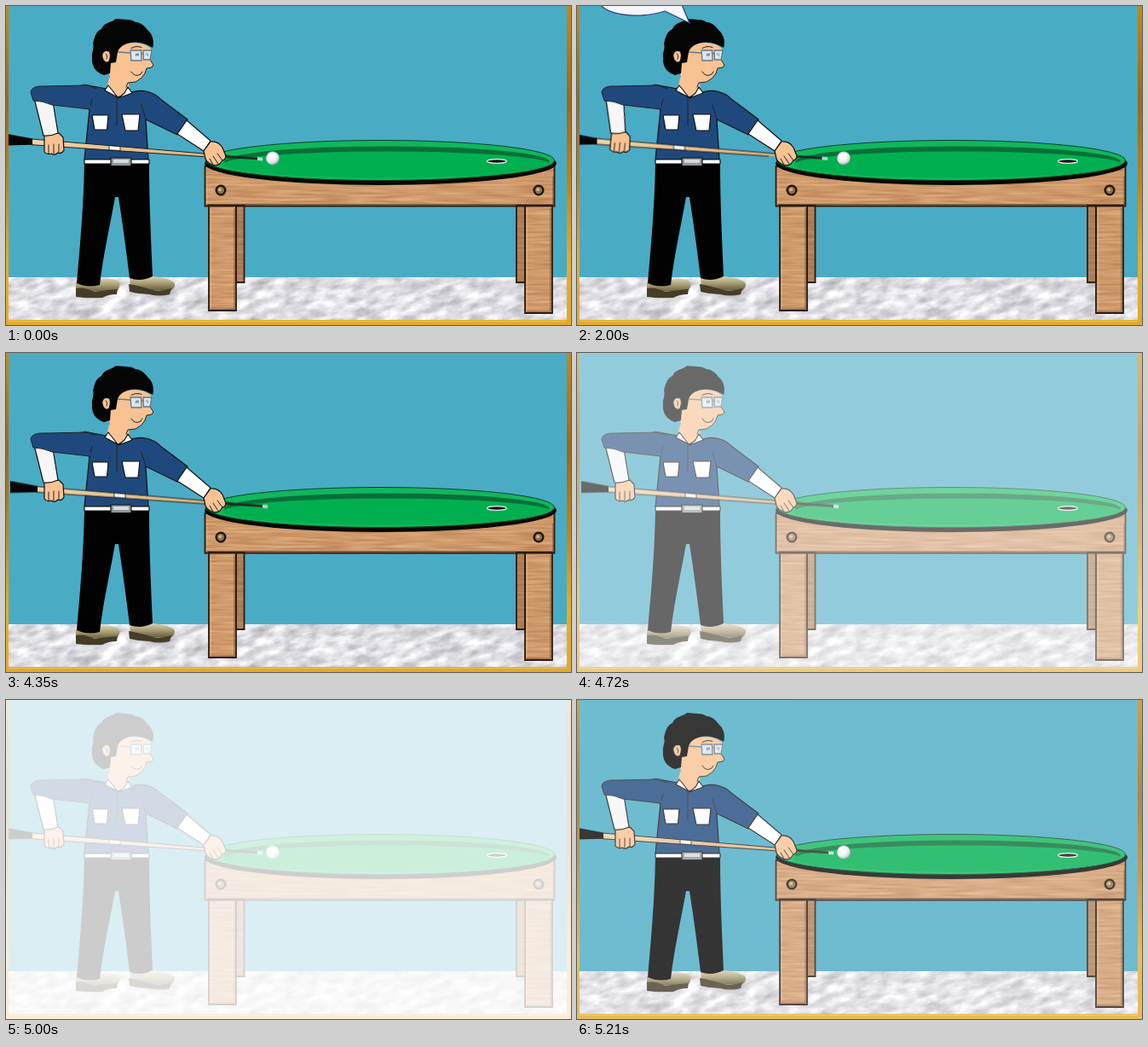
An HTML page that plays this animation: 663x374 px, repeating every 5280 ms.

```html
<!DOCTYPE html>
<html lang="en">
<head>
<meta charset="utf-8">
<title>Pool shot</title>
<style>
  html, body { margin: 0; height: 100%; overflow: hidden; background: #fff; }
  svg { display: block; width: 100vw; height: 100vh; }

  .cue, .arm, .ball, .bubble, .fade { animation: 5280ms step-end infinite; }
  .cue { animation-name: cue; }
  .arm { animation-name: arm; transform-origin: 42px 110px; }
  .ball { animation-name: roll; }
  .bubble { animation-name: talk; }
  .fade { animation-name: fade; }

  @keyframes cue {
    0%, 93.37% { transform: none; }
    18.93% { transform: translate(-7.5px, -.6px); }
    56.81% { transform: translate(6px, .5px); }
  }
  @keyframes arm {
    0%, 56.81%, 93.37% { transform: none; }
    18.93% { transform: translateY(-3px) rotate(6deg); }
  }
  @keyframes roll {
    0%, 93.37% { transform: translate(313px, 178.5px); opacity: 1; }
    56.81% { transform: translate(354px, 181px); }
    62.5% { transform: translate(436px, 180px); }
    68.18% { transform: translate(476px, 180px); }
    71.02% { transform: translate(506px, 180px); }
    73.86% { transform: translate(532px, 179px); }
    76.7% { transform: translate(553px, 178px); }
    79.54% { transform: translate(574px, 176px); opacity: 1; }
    82.38% { transform: translate(574px, 176px); opacity: 0; }
  }
  @keyframes talk {
    0%, 56.81% { opacity: 0; }
    37.87% { opacity: 1; }
  }
  @keyframes fade {
    0% { opacity: 0; }
    88.06%, 98.67% { opacity: .2; }
    89.39%, 97.34% { opacity: .4; }
    90.71%, 96.02% { opacity: .6; }
    92.04%, 94.69% { opacity: .8; }
    93.37% { opacity: 1; }
  }

  .skin { fill: #f8c293; }
  .shirt { fill: #1f497d; }
  .line { stroke: #111; stroke-width: 1.2; stroke-linejoin: round; }
  .thin { fill: none; stroke: #222; stroke-width: 1; stroke-linecap: round; }
</style>
</head>
<body>
<svg viewBox="0 0 663 374" preserveAspectRatio="none">
  <defs>
    <filter id="wood" x="0" y="0" width="1" height="1" color-interpolation-filters="sRGB">
      <feTurbulence type="fractalNoise" baseFrequency=".02 .35" numOctaves="2" seed="4"/>
      <feColorMatrix values=".22 0 0 0 .7  .26 0 0 0 .47  .26 0 0 0 .29  0 0 0 0 1"/>
      <feComposite in2="SourceAlpha" operator="in"/>
    </filter>
    <filter id="marble" x="0" y="0" width="1" height="1" color-interpolation-filters="sRGB">
      <feTurbulence type="fractalNoise" baseFrequency=".05 .09" numOctaves="4" seed="9"/>
      <feColorMatrix values=".5 0 0 0 .62  .5 0 0 0 .62  .48 0 0 0 .65  0 0 0 0 1"/>
    </filter>
    <radialGradient id="shine" cx=".4" cy=".35" r=".65">
      <stop offset=".35" stop-color="#fff"/>
      <stop offset=".8" stop-color="#dcdcdc"/>
      <stop offset="1" stop-color="#999"/>
    </radialGradient>
    <linearGradient id="gold" x2="0" y2="1">
      <stop offset="0" stop-color="#c08a1c"/>
      <stop offset=".3" stop-color="#99691a"/>
      <stop offset=".55" stop-color="#b9851e"/>
      <stop offset=".8" stop-color="#e3ad30"/>
      <stop offset="1" stop-color="#e2aa2c"/>
    </linearGradient>
    <linearGradient id="shoe" x2="0" y2="1">
      <stop offset="0" stop-color="#d9d2b4"/>
      <stop offset=".5" stop-color="#a39a70"/>
      <stop offset="1" stop-color="#5e563a"/>
    </linearGradient>
    <linearGradient id="shaft" x2="0" y2="1">
      <stop offset="0" stop-color="#f3d9ae"/>
      <stop offset="1" stop-color="#d8ad78"/>
    </linearGradient>
    <clipPath id="floor"><path d="M0 318h663v56H0z"/></clipPath>
    <clipPath id="felt"><ellipse cx="439" cy="181" rx="204" ry="23"/></clipPath>
    <g id="frame">
      <path d="M270 234h9.500v90h-9.500zM599 234h10v90h-10z"/>
      <path d="M238 234h32v123h-32zM609 234h32v126h-32z"/>
      <path d="M233.500 188h410v46.500h-410z"/>
    </g>
    <g id="bolt">
      <circle r="6.500" fill="#1b130c"/>
      <circle r="4.200" fill="#8f7040"/>
      <circle cx="-.8" cy="-.8" r="2" fill="#d2b47c"/>
    </g>
  </defs>

  <path fill="#4aabc5" d="M0 0h663v374H0z"/>
  <g clip-path="url(#floor)">
    <rect x="180" y="310" width="800" height="70" transform="skewX(-35)" filter="url(#marble)"/>
  </g>

  <!-- table -->
  <use href="#frame" filter="url(#wood)"/>
  <path fill="#2a1505" opacity=".2" d="M270 235h10v89h-10zM599 235h10v89h-10z"/>
  <use href="#frame" fill="none" stroke="#2b1a0d" stroke-width="1.800"/>
  <path fill="none" stroke="#f0cfa4" opacity=".4" d="M240.500 354V237M611.500 357V237M236 231V200"/>
  <path fill="none" stroke="#4a2c14" opacity=".6" d="M268 237v118h-28M639 237v121h-28M236 232.500h406V200"/>
  <use href="#bolt" x="252" y="216"/>
  <use href="#bolt" x="625" y="216"/>
  <ellipse cx="439.500" cy="184.500" rx="206.500" ry="25.500" fill="#050a06"/>
  <ellipse cx="439" cy="181" rx="204.500" ry="23.500" fill="#10b75c" stroke="#0a4525" stroke-width="1"/>
  <g clip-path="url(#felt)">
    <ellipse cx="447" cy="182.500" rx="191" ry="18" fill="#077038"/>
    <ellipse cx="447" cy="186" rx="193" ry="15.500" fill="#00b050"/>
  </g>
  <ellipse cx="576" cy="182" rx="11.500" ry="2.400" fill="#111" stroke="#f2f2f2" stroke-width="1.200"/>

  <g class="ball"><circle r="7.800" fill="url(#shine)"/></g>

  <!-- shoes and trousers -->
  <g fill="url(#shoe)">
    <path d="M82 324L110 321Q122 317 132 323Q135 328 131 333L82 336Z"/>
    <path d="M145 318L172 317Q190 318 198 325Q199 330 193 334L146 332Z"/>
  </g>
  <path fill="#453d28" d="M82 331Q92 329 103 335Q118 333 131 332L130 338Q120 338 113 342Q96 343 82 341ZM144 326Q160 329 172 333Q184 335 194 331L192 338Q180 341 168 338Q156 338 145 335Z"/>
  <path fill="#020202" d="M92 184H168C168 230 170 270 172 317Q158 324 145 319C141 285 136 250 132 224H128C122 258 114 292 110 327Q96 331 83 325C87 280 91 235 92 184Z"/>

  <!-- torso -->
  <path class="skin" d="M121 84L143 86L145 98L132 110L118 97Z"/>
  <path class="shirt line" d="M96 93L118 97L131 107L147 101C160 97 174 101 181 109L213 133L201 151L164 133L167 180H92L98 121L88 119V93Z"/>
  <path class="thin" stroke-width="1.500" d="M130 107V140M164 133L159 116M98 121L101 110"/>
  <path class="line" fill="#fff" stroke-width=".7" d="M120 93L116 99L131 107L124 98ZM143 95L148 102L132 108L139 102Z"/>
  <path class="line" fill="#fff" stroke-width=".7" d="M101 128H120L118.500 145H104ZM136 127H157L155 146H140Z"/>
  <path class="line" fill="#fff" d="M92 180H168V185H92Z"/>
  <path class="line" fill="#8f979c" d="M123 178H147V187.500H123Z"/>
  <path fill="#d5dadd" d="M126 180h18v4h-18z"/>
  <path class="line" fill="#fff" d="M201 150L212 134L240 158L232 170Z"/>

  <!-- head -->
  <path class="skin" d="M124 52L134 46C147 41 164 43 170 50L169 62L173 69L171 72L165 73L163 79Q160 85 152 89L143 90L141 95H122C123 86 122 82 120 76Z"/>
  <path class="thin" stroke-width=".7" d="M169 63L173 69L171 72L165 73L163 79Q160 85 152 89L143 90L141 95"/>
  <path fill="#050505" d="M115 81C105 78 100 70 101 60C100 55 104 50 102 44C104 37 105 30 112 27C115 19 125 19 129 15C138 16 147 15 152 19C160 19 164 26 168 30C173 35 174 44 172 49C166 45 155 41 146 43C138 45 133 48 131 54L129 66L123 67L122 79Z"/>
  <path class="skin line" d="M121 53C115 51 112 55 113 60C114 65 118 68 121 65Q124 57 121 53Z"/>
  <path class="thin" d="M117 56Q120 58 118 62M147 49.500Q153 46 159 48.500M147 77Q151 84 158 80L160 77"/>
  <g fill="#d3e5ee" stroke="#6b7880" stroke-width="1.300">
    <path fill="none" d="M131 54L146 55M158 56H161"/>
    <path d="M146 52H158.500L159 64H147ZM161 52H171L169 63H161.500Z"/>
  </g>
  <path fill="#7d93a2" d="M151 55.500h5v3h-5zM164 55.500h3v3h-3z"/>
  <path stroke="#fff" d="M148.500 61l4-6M163 61l3-5"/>

  <!-- cue -->
  <g class="cue">
    <path fill="url(#shaft)" d="M30 156L232 173L262 175.500V177.500L232 176.500L30 162.500Z"/>
    <path class="thin" d="M30 156L262 175.500M30 162.700L232 176.700"/>
    <path fill="#060606" d="M-1 149.500L31 155.500V162.800L-1 163.500Z"/>
    <path fill="#fff" stroke="#111" stroke-width=".8" d="M121 163.700L134 164.800V169.500L121 168.700Z"/>
    <path fill="#24251f" d="M250 174.500L296 177.700V180.300L250 177.600Z"/>
    <path fill="#b9d5da" d="M295 177.300L301 177.800V181.500L295 181Z"/>
  </g>

  <!-- back arm -->
  <g class="arm">
    <path class="skin line" d="M45 150L62 149L67 154L68 169Q65 174 61 172Q57 176 53 173Q48 175 45 171Z"/>
    <path class="thin" stroke-width=".7" d="M50 173V163M56 173V162M62 172V162"/>
    <path class="line" fill="#f6f6f6" d="M32 104L54 106L61 149Q52 153 44 152Z"/>
  </g>
  <path class="shirt" d="M99 93L46 94Q30 93 29 101L32 111Q43 111 54 116L99 121Z"/>
  <path class="thin" stroke-width="1.300" d="M97 93L46 94Q30 93 29 101L32 111Q43 111 54 116L98 121M92 92L106 97"/>

  <!-- front hand -->
  <path class="skin line" d="M232 170L240 159Q249 158 254 166L258 176Q258 180 254 181L251 185Q246 188 242 186Q236 184 234 179Z"/>
  <path class="thin" stroke-width=".7" d="M243 176L249 185M248 173L254 181M239 179L243 186"/>

  <!-- speech bubble -->
  <path class="bubble" fill="#f4f6fc" stroke="#2d477c" stroke-width="1.300" d="M26 -4C31 6 50 12 76 11Q91 10 103 6L132 20L122 -4Z"/>

  <!-- border -->
  <path fill="url(#gold)" d="M0 0h3v368h655V0h5v374H0z"/>
  <path fill="none" stroke="#f6d070" opacity=".6" d="M3 369.500h655"/>

  <path class="fade" fill="#fff" d="M0 0h663v374H0z"/>
</svg>
</body>
</html>
```
